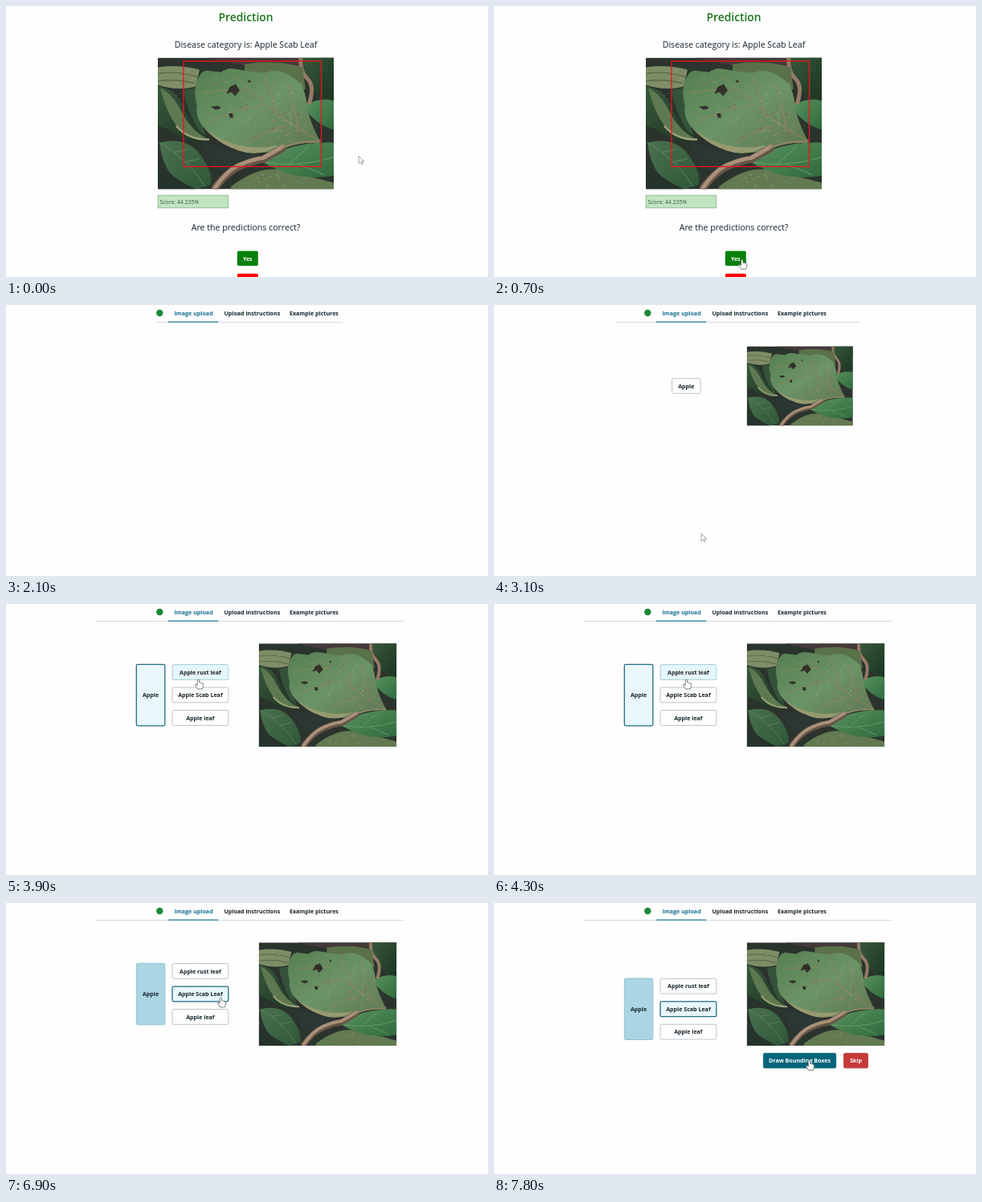
An HTML page for the animation above (7900 ms loop, 600 px wide and 338 px high).

```html
<!DOCTYPE html>
<html lang="en">
<head>
<meta charset="utf-8">
<title>Leaf disease prediction</title>
<style>
html, body { margin: 0; width: 100%; height: 100%; overflow: hidden; background: #fefefe; }
svg { display: block; }
#stage { width: 100vw; height: 100vh; }
text { font-family: "Open Sans", "Noto Sans", sans-serif; fill: #16242c; }
.bold { font-size: 7.1px; font-weight: 700; }
.ask { font-size: 10.6px; font-weight: 500; }
.mid { text-anchor: middle; }
</style>
</head>
<body>
<svg id="stage" viewBox="0 0 600 338">
  <defs>
    <linearGradient id="leafTone" x1="0" y1="0" x2="1" y2="1">
      <stop offset="0" stop-color="#557f50"/>
      <stop offset=".5" stop-color="#6b9468"/>
      <stop offset="1" stop-color="#5f7551"/>
    </linearGradient>
    <linearGradient id="darkTone" x1="0" y1="0" x2="1" y2="1">
      <stop offset="0" stop-color="#37583b"/>
      <stop offset="1" stop-color="#1c3422"/>
    </linearGradient>
    <linearGradient id="freshTone" x1="0" y1="0" x2="1" y2="1">
      <stop offset="0" stop-color="#5b9360"/>
      <stop offset="1" stop-color="#2f6a3d"/>
    </linearGradient>
    <symbol id="photo" viewBox="0 0 219 164" preserveAspectRatio="none">
      <rect width="219" height="164" fill="#2b332d"/>
      <path d="M60 0H219V20L120 12Z" fill="#443a39"/>
      <path d="M0 12Q25 8 52 15L47 36Q25 42 0 34Z" fill="#7e8d66"/>
      <path d="M0 20Q24 16 50 24M0 29Q24 26 46 32" fill="none" stroke="#566b48" stroke-width="1.4"/>
      <path d="M0 36Q22 38 30 58T64 102Q36 108 18 92L0 84Z" fill="url(#darkTone)"/>
      <path d="M3 38Q18 44 30 68T64 102Q36 103 23 85T3 38Z" fill="#5e7851"/>
      <path d="M23 85Q38 103 64 102" fill="none" stroke="#a2a27c" stroke-width="2.5"/>
      <path d="M32 40Q36 68 52 92L60 98Q52 76 46 38Z" fill="#345239"/>
      <path d="M2 106Q35 98 52 120T66 158L48 164Q8 156 2 106Z" fill="url(#freshTone)" opacity=".65"/>
      <path d="M2 106Q38 126 60 162M20 118L38 114M34 130L52 126" fill="none" stroke="#6c936b" stroke-width=".7"/>
      <path d="M0 132Q24 154 48 164H0Z" fill="#26332b"/>
      <path d="M58 105Q90 116 122 120L92 150 66 134Z" fill="#2b3733"/>
      <path d="M178 0H219V54Q200 50 190 38Z" fill="url(#darkTone)"/>
      <path d="M181 60Q205 48 219 54V90Q194 82 181 60Z" fill="url(#freshTone)"/>
      <path d="M178 0Q176 16 186 26T188 58" fill="none" stroke="#967a67" stroke-width="5"/>
      <path d="M108 8Q150 2 180 12L184 40Q160 26 108 18Z" fill="#5a7149"/>
      <path d="M48 31Q53 16 61 16L79 18Q86 12 96 14T131 19Q146 14 156 18T179 33Q184 44 186 61T203 106Q174 104 146 116Q124 122 101 114Q82 110 73 101T56 86Q46 72 49 61Q44 44 48 31Z" fill="url(#leafTone)"/>
      <path d="M56 86Q75 103 101 109T150 109Q128 125 101 116T56 86Z" fill="#979a70"/>
      <path d="M203 104Q162 84 128 52T92 26M176 92Q170 64 162 32M150 73Q142 44 132 22M162 84Q132 91 112 108M132 60Q100 62 64 80M112 40Q86 38 56 44" fill="none" stroke="#97825f" stroke-width="1"/>
      <path d="M90 36L97 33 102 41 96 48 92 43 85 45Z" fill="#33302a"/>
      <path d="M66 61L75 60 79 63 72 65ZM88 70L93 69 94 75 90 75ZM112 28L115 28 116 30 113 31Z" fill="#33302a"/>
      <path d="M92 160Q126 134 154 140T219 156V164H90Z" fill="#627a51"/>
      <path d="M130 130Q162 104 219 106V147Q174 156 130 130Z" fill="url(#freshTone)"/>
      <path d="M130 130Q174 138 219 124M162 134L188 111M176 133L207 146" fill="none" stroke="#78a673" stroke-width=".8"/>
      <path d="M70 164Q86 142 103 135T131 127L157 112" fill="none" stroke="#665447" stroke-width="9"/>
      <path d="M70 164Q86 140 103 133T131 125L157 110" fill="none" stroke="#aa9079" stroke-width="5"/>
      <path d="M154 113Q176 103 201 105" fill="none" stroke="#8f8464" stroke-width="2.5"/>
      <g id="spots"/>
    </symbol>
  </defs>
  <rect width="600" height="338" fill="#fefefe"/>

  <g id="result">
    <text x="298.5" y="19" class="mid" style="font-size:13.8px;font-weight:600;fill:#1b741d">Prediction</text>
    <text x="298.5" y="52" class="mid ask">Disease category is: Apple Scab Leaf</text>
    <use href="#photo" x="189" y="64.5" width="219" height="164"/>
    <rect x="221" y="68.8" width="171.5" height="131.6" fill="none" stroke="#e8141c" stroke-width="1.3"/>
    <rect x="189.2" y="236.2" width="87.3" height="15.6" fill="#c1e5c1" stroke="#86b58a" stroke-width=".9"/>
    <text x="191.5" y="246.6" style="font-size:6.9px;fill:#3c5548">Score: 44.235%</text>
    <text x="298.5" y="279.5" class="mid ask">Are the predictions correct?</text>
    <rect x="287.8" y="305.6" width="26" height="18.4" rx="1.8" fill="#0a800c"/>
    <text x="300.7" y="317.7" class="mid" style="font-size:7px;font-weight:700;fill:#fff">Yes</text>
    <rect x="287.8" y="333.7" width="26" height="18" rx="1.8" fill="#fa0505"/>
  </g>

  <g id="upload">
    <path id="rule" stroke="#cbd9e2" stroke-width=".9"/>
    <path d="M202 21.2H264" stroke="#257c99" stroke-width="1.3"/>
    <circle cx="191.3" cy="10" r="4.2" fill="#19883a"/>
    <text x="209.5" y="13" class="bold" style="fill:#1a7190">Image upload</text>
    <text x="271.4" y="13" class="bold">Upload instructions</text>
    <text x="353" y="13" class="bold">Example pictures</text>
    <use id="shot" href="#photo"/>
    <g id="buttons"></g>
  </g>

  <g id="cursor" stroke-linejoin="round">
    <path id="arrow" d="M0 0V9.4L2.2 7.4 3.8 10.4 5.3 9.6 3.8 6.7H6.6Z" fill="#fff" stroke="#77797c" stroke-width=".7"/>
    <path id="hand" d="M-1.3 .8Q0-.9 1.2 .8V4Q2.2 3.4 2.9 4.3Q4 3.8 4.5 4.9Q6 4.6 6 6.2V8.5Q5.6 10 4.7 12H-.9L-3.8 7.8Q-4.6 6.4-3.4 5.9L-1.3 7.4Z" fill="#fff" stroke="#45494d" stroke-width=".7"/>
  </g>
</svg>
<script>
const LOOP = 7900, STEP = 100;
const PAGE = 2000, PHOTO = 2500, OPEN = 3900, PICK = 6400, DONE = 7000;
const $ = id => document.getElementById(id);

function make(parent, tag, attrs) {
  const el = document.createElementNS("http://www.w3.org/2000/svg", tag);
  set(el, attrs);
  return parent.appendChild(el);
}
function set(el, attrs) {
  for (const k in attrs) el.setAttribute(k, attrs[k]);
}
const show = (el, on) => el.setAttribute("visibility", on ? "visible" : "hidden");

// Rust speckles on the main leaf and along the bottom edge
let seed = 7;
function rnd() {
  seed = (seed * 16807) % 2147483647;
  return seed / 2147483647;
}
function speckle(n, cx, cy, rx, ry) {
  for (let i = 0; i < n; i++) {
    const a = rnd() * 2 * Math.PI, d = Math.sqrt(rnd());
    make($("spots"), "circle", {
      cx: (cx + rx * d * Math.cos(a)).toFixed(1),
      cy: (cy + ry * d * Math.sin(a)).toFixed(1),
      r: (.3 + rnd() * .7).toFixed(2),
      fill: rnd() < .65 ? "#8c5f4b" : "#b1a27c", opacity: .75
    });
  }
}
speckle(130, 138, 70, 42, 42);
speckle(70, 164, 84, 22, 20);
speckle(30, 82, 55, 28, 32);
speckle(45, 152, 153, 45, 9);
speckle(20, 24, 25, 22, 9);

const STYLE = {
  plain: ["#fefefe", "#b7bec6", .9],
  hover: ["#e7f6fc", "#9cc9d9", .9],
  focus: ["#e8f7fc", "#256b80", 1.3],
  chosen: ["#abd5e2", "#8dbfcd", .9],
  draw: ["#04647a", "#04647a", .9],
  skip: ["#c53a37", "#c53a37", .9]
};

function button(label) {
  const g = make($("buttons"), "g", {});
  const rect = make(g, "rect", { rx: 1.7 });
  const text = make(g, "text", { class: "bold mid" });
  text.textContent = label;
  return (on, x, y, w, h, style) => {
    show(g, on);
    const [fill, stroke, line] = STYLE[style];
    set(rect, { x, y, width: w, height: h, fill, stroke, "stroke-width": line });
    set(text, { x: x + w / 2, y: y + h / 2 + 2.6 });
    text.style.fill = style === "draw" || style === "skip" ? "#fff" : "";
  };
}
const apple = button("Apple");
const kinds = ["Apple rust leaf", "Apple Scab Leaf", "Apple leaf"].map(button);
const drawBoxes = button("Draw Bounding Boxes");
const skip = button("Skip");

// Pointer stops: time, x, y
const stops = [
  [0, 439, 187], [800, 303, 322], [1000, 301, 352], [3000, 262, 350],
  [3100, 258, 285], [3700, 239.5, 94], [4600, 239.5, 94],
  [5400, 267.5, 118], [7000, 267.5, 118], [7400, 345, 226], [7800, 392.5, 196.5]
];
function pointer(t) {
  let i = 0;
  while (i < stops.length - 2 && t >= stops[i + 1][0]) i++;
  const [t0, x0, y0] = stops[i], [t1, x1, y1] = stops[i + 1];
  const u = Math.min(1, (t - t0) / (t1 - t0)), k = u * u * (3 - 2 * u);
  return [x0 + (x1 - x0) * k, y0 + (y1 - y0) * k];
}

function render(t) {
  const [px, py] = pointer(t);
  const over = (x, y, w, h) => px >= x && px <= x + w && py >= y && py <= y + h;
  const open = t >= OPEN, picked = t >= PICK, done = t >= DONE;
  const dy = done ? 18.7 : 0;
  let hot = t < PAGE && over(288, 306, 26, 18);

  show($("result"), t < PAGE);
  show($("upload"), t >= PAGE);
  const [left, right] = open ? [111, 495] : t >= PHOTO ? [151, 456] : [186, 419];
  $("rule").setAttribute("d", `M${left} 21.5H${right}`);
  show($("shot"), t >= PHOTO);
  set($("shot"), open
    ? { x: 314.7, y: 49.3, width: 171.5, height: 128.6 }
    : { x: 314.7, y: 51.5, width: 132, height: 99 });

  if (open) {
    apple(true, 162.3, 75.3 + dy, 35.5, 76.5, picked ? "chosen" : "focus");
  } else {
    const on = t >= PHOTO, box = [221.7, 91.7, 35.3, 18.6];
    const lit = on && over(...box);
    hot = hot || lit;
    apple(on, ...box, lit ? "hover" : "plain");
  }
  kinds.forEach((kind, i) => {
    const box = [207, 75.6 + 28.5 * i + dy, 69.8, 18.8];
    const lit = open && over(...box);
    hot = hot || lit;
    kind(open, ...box, picked && i === 1 ? "focus" : lit ? "hover" : "plain");
  });
  drawBoxes(done, 335.4, 187.4, 90.2, 18.4, "draw");
  skip(done, 435.4, 187.4, 30, 18.4, "skip");
  hot = hot || (done && over(335, 187, 91, 19));

  $("cursor").setAttribute("transform", `translate(${px.toFixed(2)} ${py.toFixed(2)})`);
  show($("arrow"), !hot);
  show($("hand"), hot);
}

const start = performance.now();
function tick(now) {
  const t = Math.max(0, now - start) % LOOP;
  render(Math.floor(t / STEP) * STEP);
  requestAnimationFrame(tick);
}
render(0);
requestAnimationFrame(tick);
</script>
</body>
</html>
```
